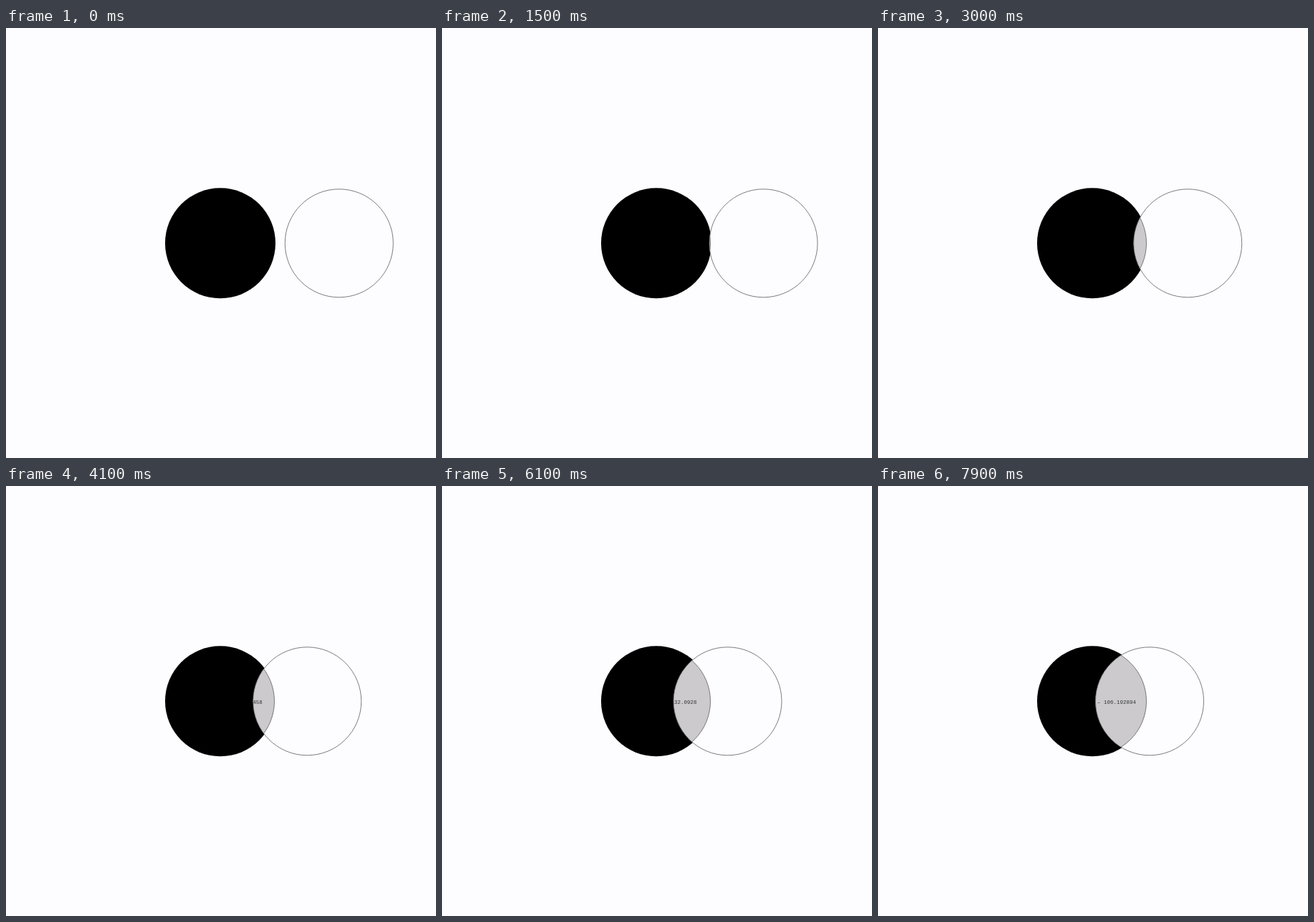
These frames come from a looping animation (600x600 px, 8000 ms). An HTML page with a canvas:

```html
<!DOCTYPE html>
<html lang="en">
<head>
<meta charset="utf-8">
<title>Overlapping circles</title>
<style>
html, body { margin: 0; width: 100%; height: 100%; overflow: hidden; background: #fdfcfe; }
canvas { display: block; }
</style>
</head>
<body>
<canvas id="stage" width="600" height="600"></canvas>
<script>
const ctx = document.getElementById('stage').getContext('2d');
const LOOP = 8000, STEP = 100;
const BG = '#fdfcfe', LENS = '#cccacd', LINE = '#5c5b5d';
const CX = 299, CY = 300.3, R = 75.5;
const UNIT = 1.3275; // distance units per pixel
const TEXT_X = 333, TEXT_Y = 304;

// [step, distance between centres]
const KEYS = [[0, 220.1], [41, 160.97458], [52, 145.1936], [61, 132.0928], [79, 106.192894]];

function distanceAt(step) {
  let i = 0;
  while (i < KEYS.length - 2 && step >= KEYS[i + 1][0]) i++;
  const [s0, d0] = KEYS[i], [s1, d1] = KEYS[i + 1];
  return d0 + (d1 - d0) * (step - s0) / (s1 - s0);
}

// Shortest decimal form of a single precision value
function floatText(value) {
  const f = Math.fround(value);
  for (let d = 1; d < 8; d++) {
    const s = f.toFixed(d);
    if (Math.fround(+s) === f) return s;
  }
  return f.toFixed(8);
}

function circle(x, r) {
  ctx.beginPath();
  ctx.arc(x, CY, r, 0, Math.PI * 2);
}

function fill(x, r, color) {
  circle(x, r);
  ctx.fillStyle = color;
  ctx.fill();
}

function outline(x) {
  circle(x, R);
  ctx.strokeStyle = LINE;
  ctx.lineWidth = 0.8;
  ctx.stroke();
}

function draw(time) {
  const distance = distanceAt(Math.floor((time % LOOP) / STEP));
  const x = CX + distance / UNIT;

  ctx.fillStyle = BG;
  ctx.fillRect(0, 0, 600, 600);
  fill(CX, 77, '#000');
  fill(x, R, BG);

  ctx.save();
  circle(x, R);
  ctx.clip();
  fill(CX, R, LENS);
  outline(CX);
  ctx.fillStyle = '#333';
  ctx.font = '7.5px "Liberation Mono", monospace';
  ctx.textAlign = 'center';
  ctx.fillText('– ' + floatText(distance), TEXT_X, TEXT_Y);
  ctx.restore();

  outline(x);
}

const start = performance.now();
function frame() {
  draw(performance.now() - start);
  requestAnimationFrame(frame);
}
draw(0);
requestAnimationFrame(frame);
</script>
</body>
</html>
```
